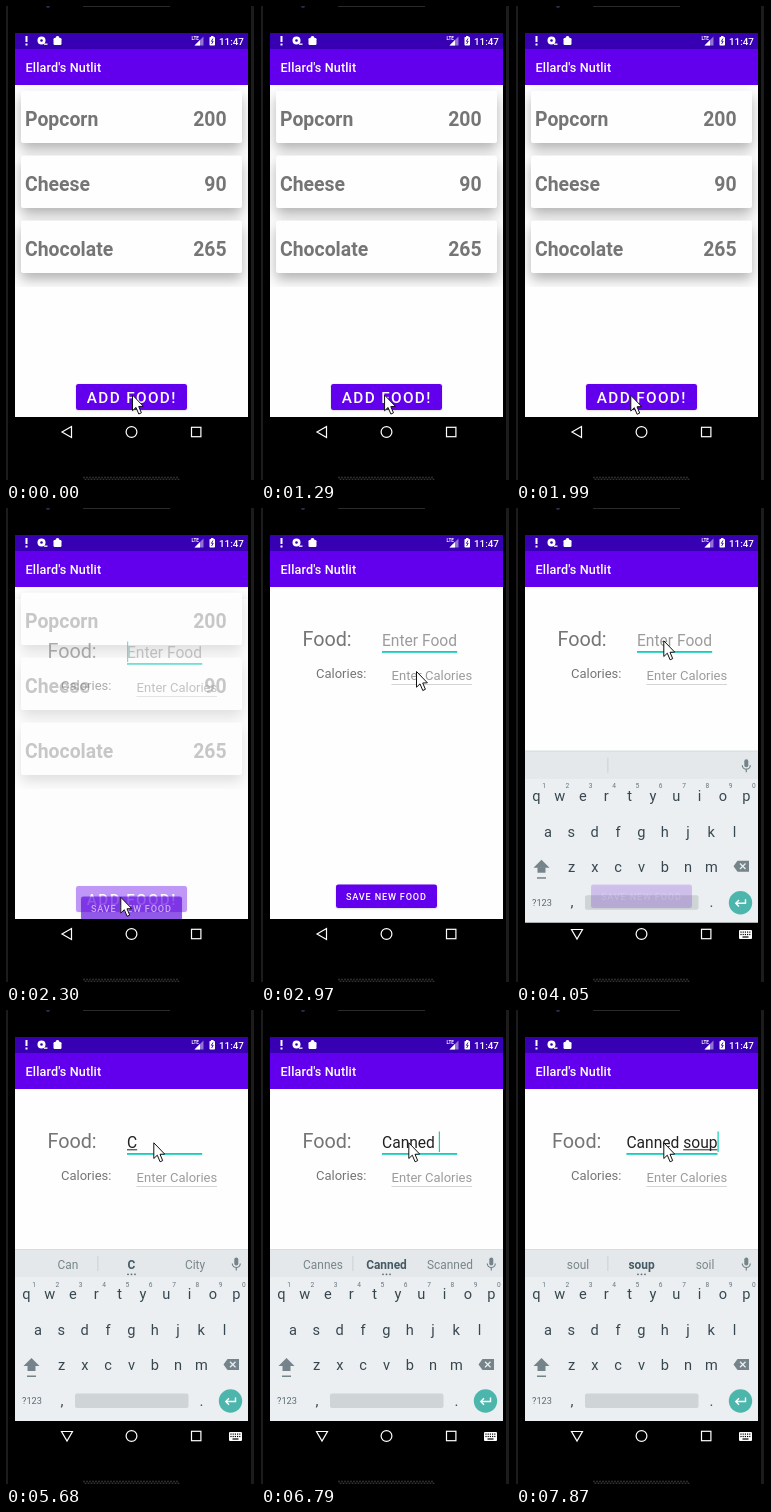
Recreate the animation shown at these times as an HTML page with a canvas. Size 249 by 474 pixels, loop 8 s.

```html
<!DOCTYPE html>
<html lang="en">
<head>
<meta charset="utf-8">
<title>Food log</title>
<style>
html, body { margin: 0; width: 100%; height: 100%; overflow: hidden; background: #000; }
canvas { display: block; width: 249px; height: 474px; }
</style>
</head>
<body>
<canvas id="stage"></canvas>
<script>
const W = 249, H = 474, LOOP = 8000;
const canvas = document.getElementById('stage');
const ctx = canvas.getContext('2d');
const dpr = window.devicePixelRatio || 1;
canvas.width = W * dpr;
canvas.height = H * dpr;

const PURPLE = '#6200ee', DARK = '#3700b3', TEAL = '#10cfbb', KEY = '#37474f', GREY = '#75838a';
const FOOD_SIZE = 15.6, FIELD_MIN = 75.2;

// Moments of the story, in ms
const OPEN = 2300, FORM = 2450, KEYS_UP = 3780, FIRST_KEY = 5030, NEXT_KEYS = 5800;
const KEY_GAP = 198, HINT_LAG = 135, STEP = 135, BLINK = 515;

const PHRASE = 'Canned soup';
// Words offered on either side of a word that begins with the key
const OFFERS = { Ca: ['Cannes', 'Scanned'], C: ['Can', 'City'], s: ['soul', 'soil'] };

const clamp = (v, a = 0, b = 1) => Math.min(b, Math.max(a, v));
const mix = (a, b, p) => a + (b - a) * p;
const progress = (t, from, to) => clamp((t - from) / (to - from));
const held = t => Math.floor(t / STEP) * STEP;

function typedAt(t) {
  if (t < FIRST_KEY) return '';
  const more = Math.floor((t - NEXT_KEYS) / KEY_GAP) + 1;
  return PHRASE.slice(0, 1 + Math.max(0, more));
}

function offersAt(t) {
  const word = typedAt(t - HINT_LAG).trim().split(' ').pop();
  const key = Object.keys(OFFERS).find(k => word.startsWith(k));
  return key ? [OFFERS[key][0], word, OFFERS[key][1]] : [];
}

function caretOn(t, typed) {
  if (typed.length > 1) return true;
  const since = typed ? t - FIRST_KEY - HINT_LAG : t - FORM;
  return since % (2 * BLINK) < BLINK;
}

function rect(x, y, w, h, color) {
  ctx.fillStyle = color;
  ctx.fillRect(x, y, w, h);
}

function round(x, y, w, h, r, color) {
  ctx.fillStyle = color;
  ctx.beginPath();
  ctx.roundRect(x, y, w, h, r);
  ctx.fill();
}

function disc(x, y, r, color) {
  ctx.fillStyle = color;
  ctx.beginPath();
  ctx.arc(x, y, r, 0, Math.PI * 2);
  ctx.fill();
}

function path(points, closed = true) {
  ctx.beginPath();
  points.forEach(([x, y]) => ctx.lineTo(x, y));
  if (closed) ctx.closePath();
}

function poly(points, color) {
  path(points);
  ctx.fillStyle = color;
  ctx.fill();
}

function line(points, color, width = 1, closed = false) {
  path(points, closed);
  ctx.strokeStyle = color;
  ctx.lineWidth = width;
  ctx.stroke();
}

function text(str, x, y, size, color, { weight = 400, align = 'left', spacing = 0 } = {}) {
  ctx.font = `${weight} ${size}px Roboto, sans-serif`;
  ctx.letterSpacing = spacing + 'px';
  ctx.textAlign = align;
  ctx.fillStyle = color;
  ctx.fillText(str, x, y);
  ctx.letterSpacing = '0px';
}

function widthOf(str, size) {
  ctx.font = `400 ${size}px Roboto, sans-serif`;
  return ctx.measureText(str).width;
}

function layer(draw) {
  ctx.save();
  draw();
  ctx.restore();
}

function clip(x, y, w, h) {
  ctx.beginPath();
  ctx.rect(x, y, w, h);
  ctx.clip();
}

function shadowed(blur, dy, alpha, draw) {
  layer(() => {
    ctx.shadowColor = `rgba(0,0,0,${alpha})`;
    ctx.shadowBlur = blur * dpr;
    ctx.shadowOffsetY = dy * dpr;
    draw();
  });
}

function phone() {
  rect(0, 0, W, H, '#000');
  rect(0, 0, 2, H, '#1c1c1d');
  rect(W - 4, 0, 3, H, '#1c1c1d');
  rect(77, 0, 87, 1, '#2a2a2b');
  disc(42, 0, 2, '#2b2b4a');
  for (let x = 78; x < 173; x += 3) {
    disc(x, 471.5, 0.9, '#343436');
    disc(x + 1.5, 473.5, 0.9, '#343436');
  }
}

function statusBar() {
  rect(9, 27, 233, 16, DARK);
  rect(19.5, 30, 2, 6, '#fff');
  rect(19.5, 37.5, 2, 2, '#fff');
  disc(35.5, 34.5, 4, '#fff');
  disc(35.5, 34.5, 1.3, DARK);
  rect(38, 37.5, 3.5, 1.3, '#fff');
  round(47.5, 32, 8, 7, 1.2, '#fff');
  disc(51.5, 32, 2, '#fff');
  text('LTE', 185.5, 34, 4.6, '#fff', { weight: 700 });
  poly([[197.5, 30.5], [197.5, 39.5], [188.5, 39.5]], 'rgba(255,255,255,.45)');
  poly([[194, 34], [194, 39.5], [188.5, 39.5]], '#fff');
  round(203.5, 31, 5.5, 8.5, 0.8, '#fff');
  rect(205, 30, 2.5, 1.5, '#fff');
  line([[207, 32.5], [205.4, 35.3], [207.2, 35.3], [205.6, 38]], DARK, 0.9);
  text('11:47', 213, 38.6, 9.8, '#fff', { weight: 500 });
}

function appBar() {
  rect(9, 43, 233, 36, PURPLE);
  text("Ellard's Nutlit", 19.6, 66, 12.6, '#fff', { weight: 500, spacing: 0.12 });
}

function button(x, y, w, h, label, tx, ty, size) {
  shadowed(2, 0.6, 0.2, () => round(x, y, w, h, 2.3, PURPLE));
  text(label, tx, ty, size, '#fff', { weight: 500, spacing: size * 0.089 });
}

const addButton = () => button(70, 378, 111, 26, 'ADD FOOD!', 80.8, 397, 15.3);
const saveButton = () => button(75, 376.5, 101, 23.5, 'SAVE NEW FOOD', 85, 391.8, 9.15);

function listScreen() {
  rect(9, 79, 233, 332, '#fefefe');
  layer(() => {
    clip(9, 79, 233, 202);
    [['Popcorn', 200], ['Cheese', 90], ['Chocolate', 265]].forEach(([name, kcal], i) => {
      const y = 84.5 + 65 * i;
      shadowed(13, 6.5, 0.3, () => round(15, y, 221, 52.5, 2, '#fefefe'));
      text(name, 19, y + 35.6, 19.4, '#757575', { weight: 700 });
      text(String(kcal), 220.5, y + 35.6, 19.4, '#757575', { weight: 700, align: 'right' });
    });
  });
  addButton();
}

function formScreen(t) {
  const typed = typedAt(t);
  const w = widthOf(typed, FOOD_SIZE);
  const field = Math.max(FIELD_MIN, w);
  // Extra width is taken evenly from the three gaps of the row.
  const shift = (field - FIELD_MIN) / 3;
  const x = 121 - 2 * shift;

  rect(9, 79, 233, 332, '#fefefe');
  text('Food:', 41.4 - shift, 138.3, 19.8, '#757575');
  if (typed) text(typed, x, 138, FOOD_SIZE, '#212121');
  else text('Enter Food', x, 138, FOOD_SIZE, '#9c9c9c');

  const from = widthOf(typed.slice(0, typed.lastIndexOf(' ') + 1), FOOD_SIZE);
  rect(x + from, 139.3, w - from, 1, '#212121');
  rect(x, 143, field, 1.8, TEAL);
  if (caretOn(t, typed)) rect(x + w, 121.5, 1.2, 20.5, TEAL);

  text('Calories:', 55, 169.6, 13, '#757575');
  text('Enter Calories', 130.6, 171.8, 13, '#9c9c9c');
  rect(130.5, 176, 80.5, 1, '#d4d4d4');
  saveButton();
}

function keyRow(keys, x, y, size = 14.6, color = KEY) {
  [...keys].forEach((k, i) => text(k, x + 23.33 * i, y, size, color, { align: 'center' }));
}

function keyboard(t) {
  rect(9, 239, 233, 172, '#eceff1');
  rect(9, 239, 233, 28, '#e4e8ea');
  rect(9, 239, 233, 0.8, '#d5dadd');
  rect(91.5, 246, 0.8, 15, '#c3cacd');
  offersAt(t).forEach((word, i) => {
    const mid = i === 1;
    text(word, 62 + 63.5 * i, 258.5, 11.9, mid ? '#455a64' : '#78868c',
      { weight: mid ? 700 : 400, align: 'center' });
    disc(122 + 3.5 * i, 264.3, 0.9, '#5b6b73');
  });

  // Microphone
  round(228.3, 247.5, 4, 8, 2, GREY);
  ctx.beginPath();
  ctx.arc(230.3, 253.5, 4, 0, Math.PI);
  ctx.strokeStyle = GREY;
  ctx.lineWidth = 1.2;
  ctx.stroke();
  rect(229.7, 257.5, 1.2, 3, GREY);

  keyRow('qwertyuiop', 20.3, 289);
  keyRow('1234567890', 28, 276.5, 6.6, '#66757c');
  keyRow('asdfghjkl', 32, 325);
  keyRow('zxcvbnm', 55.5, 360);

  // Shift
  poly([[25.5, 348], [33.5, 356], [17.5, 356]], GREY);
  rect(21.5, 355.5, 8, 5.5, GREY);
  rect(21, 365.5, 9, 1.5, GREY);
  // Backspace
  poly([[217.5, 354.5], [221.5, 349], [233, 349], [233, 360], [221.5, 360]], GREY);
  line([[224, 351.8], [229.5, 357.2]], '#eceff1', 1.3);
  line([[229.5, 351.8], [224, 357.2]], '#eceff1', 1.3);

  text('?123', 26, 394.3, 9.2, '#5b6b73', { align: 'center' });
  text(',', 56, 395.5, 15, KEY, { align: 'center' });
  round(69, 383.5, 113.5, 14.5, 2, '#cfd4d7');
  text('.', 195.5, 395.5, 15, KEY, { align: 'center' });
  disc(224.5, 391, 11.7, '#4db6ac');
  line([[229.5, 387.5], [229.5, 391.5], [220, 391.5]], '#fff', 1.4);
  line([[223, 388.3], [219.8, 391.5], [223, 394.7]], '#fff', 1.4);
}

function navBar(typing) {
  rect(9, 411, 233, 30, '#000');
  const back = typing
    ? [[55.5, 421.5], [66.5, 421.5], [61, 431]]
    : [[65.5, 420.5], [65.5, 431.5], [56, 426]];
  line(back, '#fff', 1.2, true);
  ctx.beginPath();
  ctx.arc(125.5, 426, 5.4, 0, Math.PI * 2);
  ctx.stroke();
  ctx.strokeRect(185.5, 421.3, 9.4, 9.4);
  if (!typing) return;
  round(223, 422, 13, 9, 1, '#fff');
  for (let x = 224.4; x < 235; x += 2.2) {
    rect(x, 423.5, 1.2, 1.2, '#000');
    rect(x, 425.9, 1.2, 1.2, '#000');
  }
  rect(226.5, 428.4, 6, 1.2, '#000');
}

function pointer(t) {
  const aim = progress(held(t), 990, 1890);
  const leave = progress(held(t), 2565, 2970);
  const settle = progress(held(t), 3105, 3645);
  const at = (start, add, hint, field) =>
    mix(mix(mix(start, add, aim), hint, leave), field, settle);
  layer(() => {
    ctx.translate(at(126, 114.3, 155, 147.3), at(388.5, 388.8, 163, 132.3));
    ctx.lineJoin = 'round';
    const arrow = [[0.5, 0.5], [0.5, 16.2], [4, 12.9], [6.8, 19.5], [9.4, 18.3], [6.7, 12], [11.4, 11.8]];
    poly(arrow, '#fff');
    line(arrow, '#111', 1, true);
  });
}

function screen(t) {
  clip(9, 27, 233, 414);
  if (t < FORM) listScreen();
  if (t >= OPEN) {
    layer(() => {
      clip(9, 27, 233, 384);
      if (t < FORM) {
        ctx.globalAlpha = 0.6;
        ctx.translate(0, 12);
      }
      formScreen(t);
    });
  }
  appBar();
  statusBar();
  navBar(t >= KEYS_UP);

  const shown = progress(held(t), KEYS_UP, KEYS_UP + 325);
  if (!shown) return;
  layer(() => {
    ctx.translate(0, 22 * (1 - shown));
    keyboard(t);
  });
  // The covered button fades out above the keys.
  layer(() => {
    ctx.globalAlpha = 1 - shown;
    saveButton();
  });
}

function draw(t) {
  ctx.setTransform(dpr, 0, 0, dpr, 0, 0);
  phone();
  layer(() => screen(t));
  pointer(t);
}

const start = performance.now();
function frame() {
  draw((performance.now() - start) % LOOP);
  requestAnimationFrame(frame);
}
frame();
</script>
</body>
</html>
```
